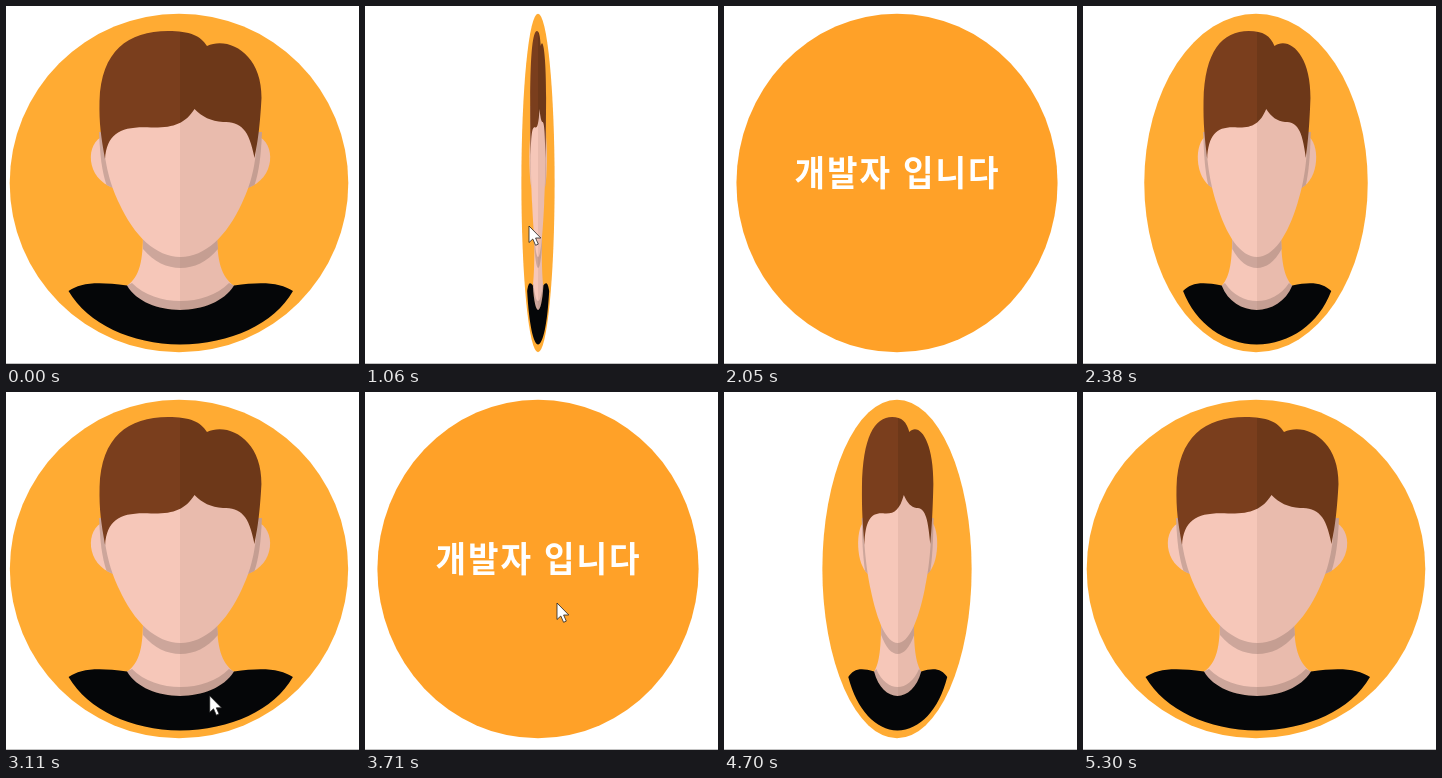
An HTML page for the animation above (5.43 s loop, 353x358 px).

```html
<!DOCTYPE html>
<html lang="ko">
<head>
<meta charset="utf-8">
<title>Flip card</title>
<style>
  html, body { margin: 0; width: 100%; height: 100%; overflow: hidden; background: #fff; }
  svg { display: block; width: 353px; height: 358px; }
  text { font: 700 35px "Noto Sans CJK KR", "Noto Sans CJK", sans-serif; letter-spacing: 2px; fill: #fff; text-anchor: middle; }
</style>
</head>
<body>
<svg viewBox="0 0 353 358">
  <defs id="defs"></defs>
  <rect y="357" width="353" height="1" fill="#c3c3c3"/>
  <g id="front">
    <circle cx="173" cy="177" r="169.3" fill="#ffab33"/>
    <g id="ear">
      <path fill="url(#skin)" d="M98 130C79 136 79 173 108 182Z"/>
      <path fill="url(#shade)" d="M93 126C94 150 96 166 100.5 179L109 183L104 126Z"/>
    </g>
    <use href="#ear" id="earRight"/>
    <path fill="url(#skin)" d="M137 226C137 255 134 270 121 280C140 312 208 312 228 280C215 270 211 255 211 226Z"/>
    <path fill="url(#shade)" d="M137 230V243C148 256 161 262 174.5 262C188 262 201 256 212 243L211 230Z"/>
    <path fill="url(#shade)" d="M120 280L126 277C150 301 199 301 223 277L229 280C208 312 140 312 120 280Z"/>
    <path fill="url(#skin)" d="M97 100V130C99 165 107 184 113 197C128 230 150 251 174.5 251C199 251 221 230 236 197C242 184 250 165 251 130V100Z"/>
    <path fill="url(#hair)" d="M99 153C95 130 93 118 93.5 95C95 45 122 25 162 25C184 25 195 30 201 40C222 30 256 47 255.5 92C254 120 252 135 248.5 152C243 123 235 116 217 116C205 115 196 111 188.5 103C179 118 167 122 145 121.5C115 120 101 127 99 153Z"/>
    <path fill="#050608" d="M62.5 285C74 277 90 275 121 279.5C140 312 208 312 228 279.5C257 275 275 277 287 285C268 318 225 338 174 338.5C125 338 82 318 62.5 285Z"/>
  </g>
  <g id="back">
    <circle cx="173" cy="177" r="169.3" fill="#ffa128"/>
    <text x="173.5" y="180">개발자 입니다</text>
  </g>
  <path id="cursor" d="M0 0V16.5L3.8 13L6.6 19.3L9.3 18.1L6.6 12H11.8Z" fill="#fff" stroke="#222" stroke-width=".8" stroke-linejoin="round"/>
</svg>
<script>
const LOOP = 5430, STEP = 66, FLIP = 1000, AXIS = 173, MIDDLE = 174.5;
const $ = id => document.getElementById(id);

// Two-tone fills, split down the middle of the head
const tones = {
  skin: ['#f6c7b9', '#e9bbad'],
  shade: ['#cda69b', '#c59e92'],
  hair: ['#7a3e1d', '#6d3819']
};
$('defs').innerHTML = Object.entries(tones).map(([id, [left, right]]) =>
  `<linearGradient id="${id}" gradientUnits="userSpaceOnUse" x1="0" x2="${2 * MIDDLE}">
    <stop offset=".5" stop-color="${left}"/><stop offset=".5" stop-color="${right}"/>
  </linearGradient>`).join('');

// The mirrored ear needs the darker tones
const mirrored = $('ear').cloneNode(true);
mirrored.removeAttribute('id');
mirrored.setAttribute('transform', `translate(${2 * MIDDLE}) scale(-1 1)`);
[...mirrored.children].forEach((part, i) =>
  part.setAttribute('fill', [tones.skin, tones.shade][i][1]));
$('earRight').replaceWith(mirrored);

// Flip start times: to the back, to the front, and again
const flips = [786, 1949, 3085, 4319];

// Pointer visits: [time, x, y]
const visits = [
  [[800, 186, 302], [1000, 164, 220], [1920, 164, 220], [1980, 158, 320]],
  [[3104, 204, 306], [3370, 192, 211], [4220, 192, 211], [4300, 186, 320]]
];

const bezier = (a, b, u) => 3 * a * u * (1 - u) ** 2 + 3 * b * u * u * (1 - u) + u ** 3;

// cubic-bezier(.25, .1, .25, 1)
function ease(x) {
  if (x <= 0) return 0;
  if (x >= 1) return 1;
  let lo = 0, hi = 1;
  for (let i = 0; i < 24; i++) {
    const mid = (lo + hi) / 2;
    if (bezier(.25, .25, mid) < x) lo = mid; else hi = mid;
  }
  return bezier(.1, 1, lo);
}

function pointerAt(t) {
  for (const path of visits) {
    for (let i = 1; i < path.length; i++) {
      const [t0, x0, y0] = path[i - 1], [t1, x1, y1] = path[i];
      if (t >= t0 && t < t1) {
        const k = (t - t0) / (t1 - t0);
        return [x0 + (x1 - x0) * k, y0 + (y1 - y0) * k];
      }
    }
  }
  return null;
}

function showFace(id, scale) {
  $(id).style.display = scale > 0 ? '' : 'none';
  $(id).setAttribute('transform', `translate(${AXIS}) scale(${scale} 1) translate(${-AXIS})`);
}

function draw(time) {
  // The picture advances in even steps
  const t = 800 + STEP * Math.floor((time - 790) / STEP);
  const turn = flips.reduce((sum, start, i) =>
    sum + (i % 2 ? -1 : 1) * ease((t - start) / FLIP), 0);
  const scale = Math.cos(Math.PI * turn);
  showFace('front', scale);
  showFace('back', -scale);

  const pos = pointerAt(t);
  $('cursor').style.display = pos ? '' : 'none';
  if (pos) $('cursor').setAttribute('transform', `translate(${pos})`);
}

const begin = performance.now();
function tick() {
  draw((performance.now() - begin) % LOOP);
  requestAnimationFrame(tick);
}
tick();
</script>
</body>
</html>
```
